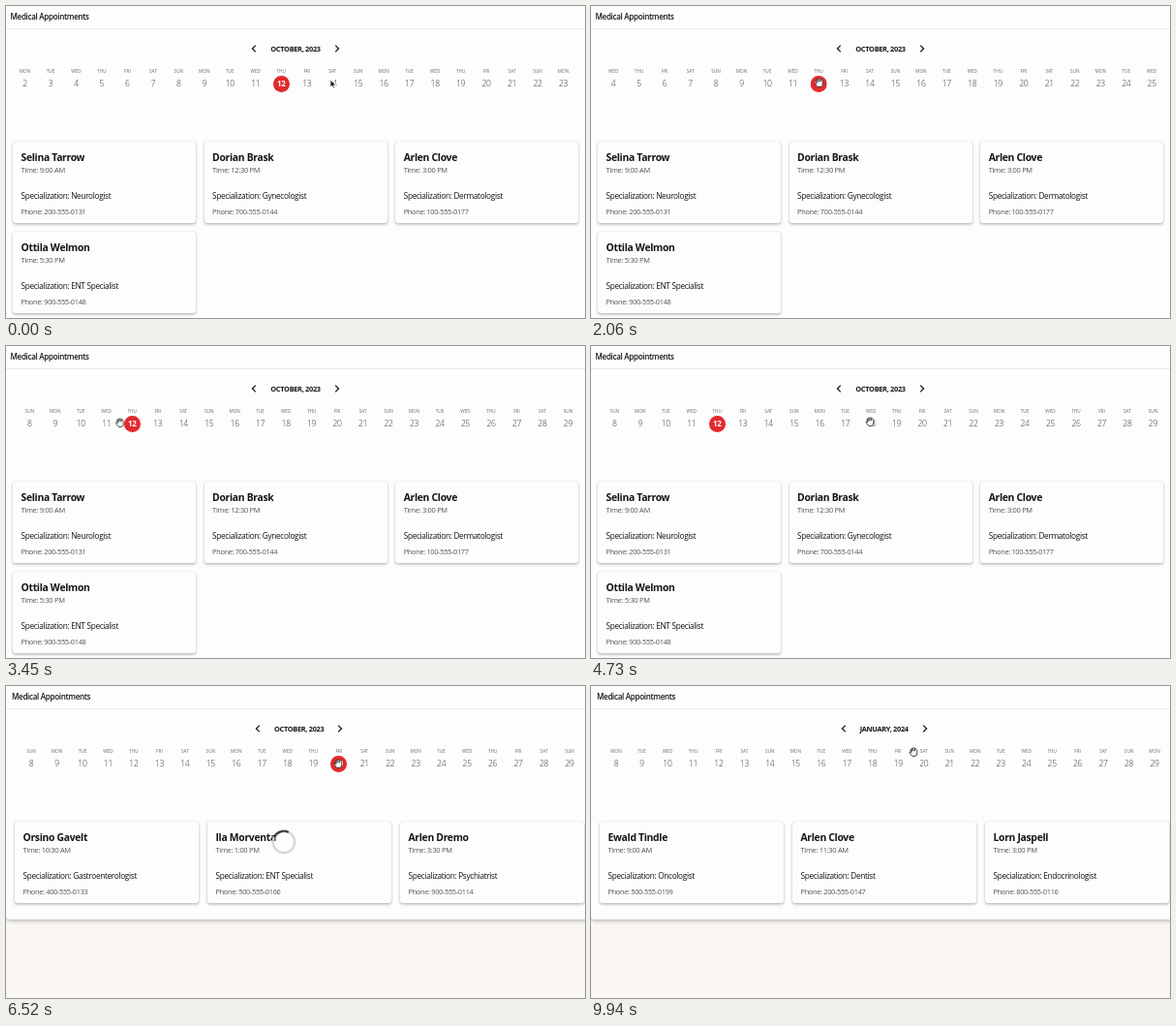
Recreate the animation shown at these times as an HTML page. Size 598 by 322 pixels, loop 10000 ms.

```html
<!DOCTYPE html>
<html lang="en">
<head>
<meta charset="utf-8">
<title>Medical Appointments</title>
<style>
  html, body { margin: 0; width: 100%; height: 100%; overflow: hidden; }
  #stage {
    position: relative; width: 598px; height: 322px; overflow: hidden;
    background: #f9f6f4; color: #161513;
    font-family: "Open Sans", "Noto Sans", sans-serif; letter-spacing: -.02em;
  }
  #stage div { position: absolute; white-space: nowrap; line-height: 10px; }
  #stage .view { inset: 0; }
  #stage .panel { left: 0; top: 0; width: 620px; background: #fdfcfe; }
  .after .panel { height: 241px; border-radius: 0 0 0 4px; box-shadow: 0 1px 4px rgba(0,0,0,.32); }
  .before .panel { height: 322px; }
  .head { left: 0; top: 0; width: 598px; height: 23px; border-bottom: 1px solid #e9e7ea; }
  .title { top: 6px; font-size: 8.05px; font-weight: 600; }
  #stage .month {
    top: 39px; width: 200px; display: flex; justify-content: center; align-items: center;
    gap: 14px; font-size: 7.4px; font-weight: 700;
  }
  .month svg { width: 6px; height: 8px; fill: none; stroke: #161513; stroke-width: 1.2; }
  .clip { top: 60px; height: 34px; overflow: hidden; }
  .strip { left: 0; top: 0; }
  .wd, .day { width: 26px; margin-left: -13px; text-align: center; }
  .wd { top: 2px; font-size: 4.7px; color: #6c6a68; letter-spacing: 0; }
  .day { top: 15px; font-size: 8.6px; font-weight: 300; color: #3d3b39; }
  #stage .sel {
    top: 12px; width: 16.6px; height: 16.6px; margin-left: -8.3px; border-radius: 50%;
    background: #e22a2c; color: #fff; font-size: 8px; font-weight: 700;
    line-height: 16.4px; text-align: center;
  }
  .card {
    height: 84px; border-radius: 2.5px; background: #fdfcfe;
    box-shadow: 0 0 1px rgba(0,0,0,.3), 0 1.5px 3px rgba(0,0,0,.26);
  }
  .card div { left: 8.5px; }
  .name { top: 11px; font-size: 10.4px; font-weight: 700; }
  .time { top: 24px; font-size: 7.5px; color: #55524f; }
  .spec { top: 50.5px; font-size: 8.25px; }
  .phone { top: 67px; font-size: 7.4px; color: #55524f; }
  #spin { left: 274px; top: 147.5px; width: 26px; height: 26px; }
  #spin svg { display: block; animation: turn 10s linear infinite; }
  @keyframes turn { from { transform: rotate(198deg); } to { transform: rotate(3798deg); } }

  .drag { animation: drag 10s ease-in-out infinite; }
  @keyframes drag {
    0%, 14.5% { transform: translateX(0); }
    19% { transform: translateX(-60px); }
    24.5% { transform: translateX(0); }
    27% { transform: translateX(0); animation-timing-function: linear; }
    27.9% { transform: translateX(-9.5px); animation-timing-function: ease-out; }
    34%, 100% { transform: translateX(-154px); }
  }
  #cursor { left: 0; top: 0; animation: move 10s ease-in-out infinite; }
  #cursor svg { position: absolute; left: -8px; top: -8px; width: 16px; height: 16px; stroke-linejoin: round; }
  @keyframes move {
    0%, 9.4% { transform: translate(336px, 77px); }
    13.6%, 14.5% { transform: translate(285px, 80px); }
    19% { transform: translate(225px, 79px); }
    24.5% { transform: translate(284px, 79px); }
    27% { transform: translate(270px, 77px); animation-timing-function: linear; }
    27.9% { transform: translate(260px, 76px); animation-timing-function: ease-out; }
    34%, 35% { transform: translate(117.5px, 79px); }
    40.6%, 42% { transform: translate(277px, 81px); }
    43.9% { transform: translate(292px, 78px); }
    47.3%, 49% { transform: translate(288px, 78px); }
    54%, 60% { transform: translate(273.5px, 78.5px); }
    64%, 65% { transform: translate(343px, 80px); }
    69.8%, 96.5% { transform: translate(351px, 50px); }
    99.2%, 100% { transform: translate(333px, 68px); }
  }
</style>
</head>
<body>
<div id="stage"></div>
<script>
const DAYS = ['SUN', 'MON', 'TUE', 'WED', 'THU', 'FRI', 'SAT'];
const PITCH = 26.48;
const LOOP = 10000;
const stage = document.getElementById('stage');
const sheet = document.head.appendChild(document.createElement('style'));
let shows = 0;

function add(parent, cls, html = '', style = {}) {
  const el = document.createElement('div');
  el.className = cls;
  el.innerHTML = html;
  Object.assign(el.style, style);
  return parent.appendChild(el);
}

// Visible only between two times of the loop, with hard cuts.
function show(el, from, to) {
  const name = 'show' + shows++;
  const pct = t => t / LOOP * 100 + '%';
  sheet.textContent += `@keyframes ${name}{0%{opacity:0}${pct(from)}{opacity:1}${pct(to)}{opacity:0}}`;
  el.style.animation = `${name} ${LOOP}ms step-end infinite`;
  return el;
}

const px = n => n + 'px';
const chevron = d => `<svg viewBox="0 0 6 8"><path d="${d}"/></svg>`;

function view(cls, titleX, from, to) {
  const v = show(add(stage, 'view ' + cls), from, to);
  add(v, 'panel');
  add(v, 'head');
  add(v, 'title', 'Medical Appointments', { left: px(titleX) });
  return v;
}

// first: weekday of the 1st; x1: position of day 1; picks: [day, from, to]
function month(v, label, first, center, x1, from, to, picks = []) {
  const box = show(add(v, 'view'), from, to);
  add(box, 'month', chevron('M4.8 .6 1.4 4l3.4 3.4') + `<span>${label}</span>` +
    chevron('M1.2 .6 4.6 4 1.2 7.4'), { left: px(center - 100) });
  const edge = center > 300 ? 9 : 7;
  const clip = add(box, 'clip', '', { left: px(edge), width: px(center > 300 ? 589 : 585) });
  const strip = add(clip, 'strip');
  const at = d => ({ left: px(x1 - edge + (d - 1) * PITCH) });
  for (let d = 1; d <= 31 - (label[0] === 'N'); d++) {
    add(strip, 'wd', DAYS[(first + d - 1) % 7], at(d));
    add(strip, 'day', d, at(d));
  }
  for (const [d, a, b] of picks) show(add(strip, 'sel', d, at(d)), a, b);
  return strip;
}

function cards(v, left, pitch, width, list, from, to) {
  const box = show(add(v, 'view'), from, to);
  list.forEach(([name, time, spec, phone], i) => {
    const card = add(box, 'card', '', {
      left: px(left + i % 3 * pitch), top: px(140 + Math.floor(i / 3) * 93), width: px(width)
    });
    add(card, 'name', name);
    add(card, 'time', 'Time: ' + time);
    add(card, 'spec', 'Specialization: ' + spec);
    add(card, 'phone', 'Phone: ' + phone);
  });
}

const PICK = 4880, LOADED = 5100, PICK2 = 6450, LOADED2 = 6650;
const NOV = 7240, DEC = 8790, JAN = 9610;

const before = view('before', 4.5, 0, LOADED);
month(before, 'OCTOBER, 2023', 0, 299, -7, 0, LOADED, [[12, 0, PICK], [18, PICK, LOADED]])
  .classList.add('drag');
cards(before, 7, 197.6, 189, [
  ['Selina Tarrow', '9:00 AM', 'Neurologist', '200-555-0131'],
  ['Dorian Brask', '12:30 PM', 'Gynecologist', '700-555-0144'],
  ['Arlen Clove', '3:00 PM', 'Dermatologist', '100-555-0177'],
  ['Ottila Welmon', '5:30 PM', 'ENT Specialist', '900-555-0148']
], 0, LOADED);

const after = view('after', 6, LOADED, LOOP);
const x1 = 26 - 7 * PITCH;
month(after, 'OCTOBER, 2023', 0, 302.7, x1, LOADED, NOV, [[18, LOADED, PICK2], [20, PICK2, NOV]]);
month(after, 'NOVEMBER, 2023', 3, 302.7, x1, NOV, DEC);
month(after, 'DECEMBER, 2023', 5, 302.7, x1, DEC, JAN);
month(after, 'JANUARY, 2024', 1, 302.7, x1, JAN, LOOP);
cards(after, 9, 199, 190, [
  ['Orsino Gavelt', '10:30 AM', 'Gastroenterologist', '400-555-0133'],
  ['Ila Morventa', '1:00 PM', 'ENT Specialist', '500-555-0166'],
  ['Arlen Dremo', '3:30 PM', 'Psychiatrist', '900-555-0114']
], LOADED, LOADED2);
cards(after, 9, 199, 190, [
  ['Ewald Tindle', '9:00 AM', 'Oncologist', '500-555-0199'],
  ['Arlen Clove', '11:30 AM', 'Dentist', '200-555-0147'],
  ['Lorn Jaspell', '3:00 PM', 'Endocrinologist', '800-555-0116']
], LOADED2, LOOP);

const ring = `<svg width="26" height="26" viewBox="-13 -13 26 26" fill="none" stroke-width="2.1">
  <circle r="11.2" stroke="#d3d1d4"/><path d="M-11.2 0A11.2 11.2 0 0 1 0-11.2" stroke="#2c2a28"/></svg>`;
const spin = add(stage, '', '');
spin.id = 'spin';
show(add(spin, '', ring), PICK, 5880);
show(add(spin, '', ring), PICK2, 7060);

const cursor = add(stage, '');
cursor.id = 'cursor';
function pointer(path, fill, stroke, ...spans) {
  for (const [from, to] of spans) {
    show(add(cursor, '', `<svg viewBox="-8 -8 16 16"><path d="${path}" fill="${fill}"
      stroke="${stroke}" stroke-width=".9"/></svg>`), from, to);
  }
}
const palm = 'V1.2Q3.8 4.2 1.6 4.4H-1.2Q-2.2 3.6-3.6 1.4Q-4.4.1-3.5-.2Q-2.8-.3-2 .7';
pointer('M-1-1V7L.9 5.3 2.2 8 3.6 7.4 2.4 4.8H5Z', '#111', '#fff', [0, 1150]);
pointer(`M-2 .7L-3-2Q-2.9-3.3-1.9-2.7Q-1.7-4.3-.4-3.7Q.6-4.8 1.4-3.5Q2.7-3.9 2.9-2.4Q4-2.2 3.8-.8${palm}` +
  'M-1.8-2.7L-1.2-.6M-.3-3.6L.1-.8M1.4-3.4V-.8', '#fff', '#222', [1150, 6900], [9720, LOOP]);
pointer(`M-2 .7V-4.2Q-1.2-5.6-.4-4.2V-1.2Q.5-2 1.2-1Q2.2-1.6 2.6-.5Q3.8-.7 3.8.2${palm}` +
  'M-.4-1.2V.6M1.2-.9V.7', '#fff', '#222', [6900, 9720]);
</script>
</body>
</html>
```
